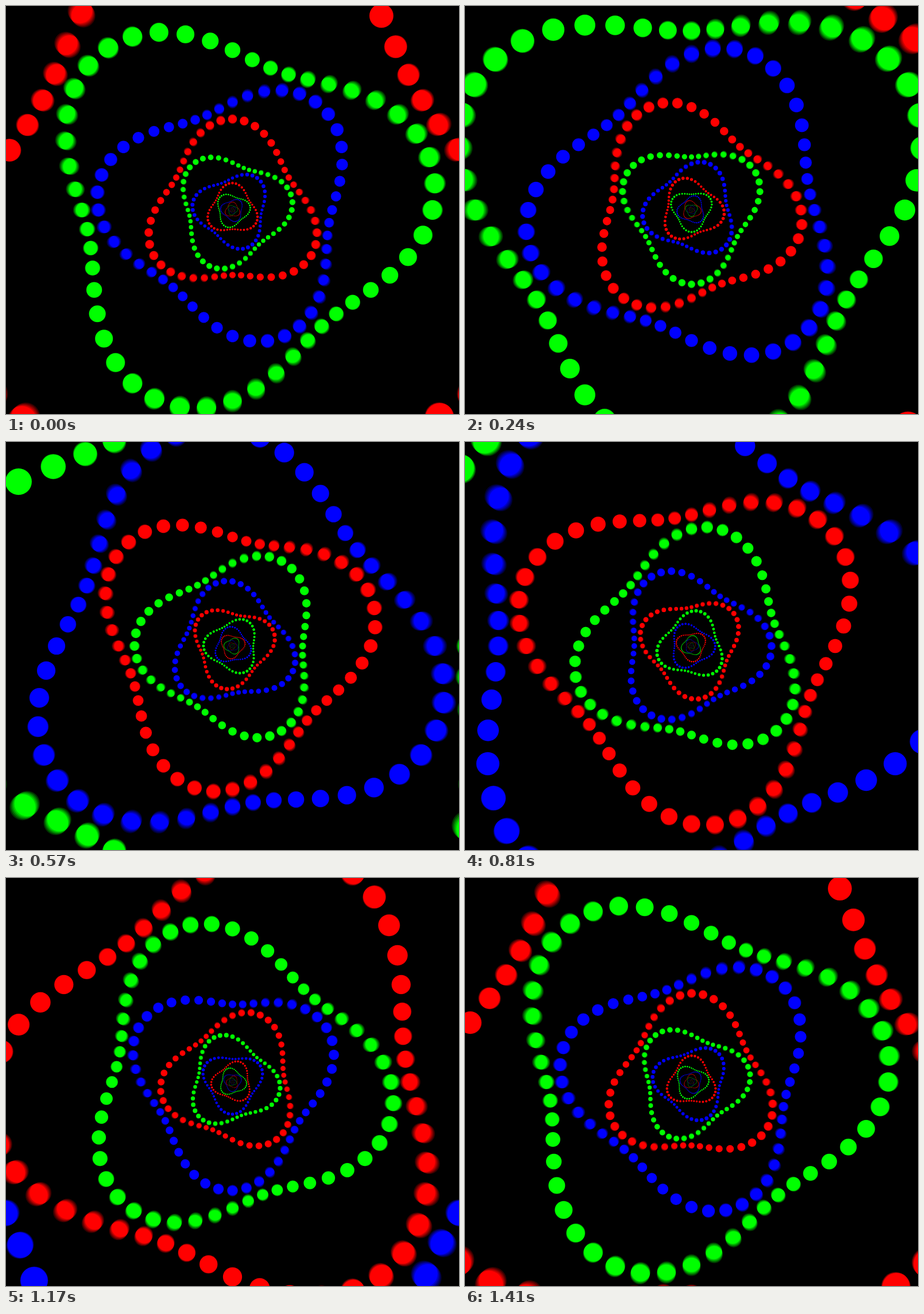
An HTML page with a canvas that plays this animation: 789x710 px, repeating every 1440 ms.

```html
<!DOCTYPE html>
<html lang="en">
<head>
<meta charset="utf-8">
<title>Dotted spiral zoom</title>
<style>
  html, body { margin: 0; width: 100%; height: 100%; overflow: hidden; background: #000; }
  canvas { display: block; }
</style>
</head>
<body>
<canvas id="stage" width="789" height="710"></canvas>
<script>
const W = 789, H = 710;
const STEP = 30, STEPS = 48;            // ms per step, steps per loop
const DOTS = 48, RATIO = 1.5, BASE = 303;
const DOT = 0.75 * Math.PI / DOTS;      // dot radius relative to its distance
const SAMPLES = 5, SHUTTER = 0.6;       // motion blur
const COLORS = ['#0f0', '#f00', '#00f'];
const TAU = 2 * Math.PI;
const ctx = document.getElementById('stage').getContext('2d', { alpha: false });

function drawRing(k, u) {
  const size = BASE * RATIO ** (k + 3 * u);
  const phase = TAU * (1 / 12 + u - k / 3);
  ctx.beginPath();
  for (let i = 0; i < DOTS; i++) {
    const a = TAU * i / DOTS;
    const r = size * (1 + Math.cos(3 * a - phase) / 6);
    const x = W / 2 + r * Math.cos(a);
    const y = H / 2 - r * Math.sin(a);
    ctx.moveTo(x + r * DOT, y);
    ctx.arc(x, y, r * DOT, 0, TAU);
  }
  ctx.fillStyle = COLORS[(k + 18) % 3];
  ctx.fill();
}

function draw(step) {
  ctx.globalCompositeOperation = 'source-over';
  ctx.globalAlpha = 1;
  ctx.fillStyle = '#000';
  ctx.fillRect(0, 0, W, H);
  // Add up evenly weighted exposures within the shutter time
  ctx.globalCompositeOperation = 'lighter';
  ctx.globalAlpha = 1 / SAMPLES;
  for (let s = 0; s < SAMPLES; s++) {
    const u = (step + (s + 0.5) * SHUTTER / SAMPLES) / STEPS;
    for (let k = -17; k <= 2; k++) drawRing(k, u);
  }
}

let shown = -1;
function tick() {
  const step = Math.floor((performance.now() + 0.5) / STEP) % STEPS;
  if (step !== shown) draw(shown = step);
  requestAnimationFrame(tick);
}
tick();
</script>
</body>
</html>
```
